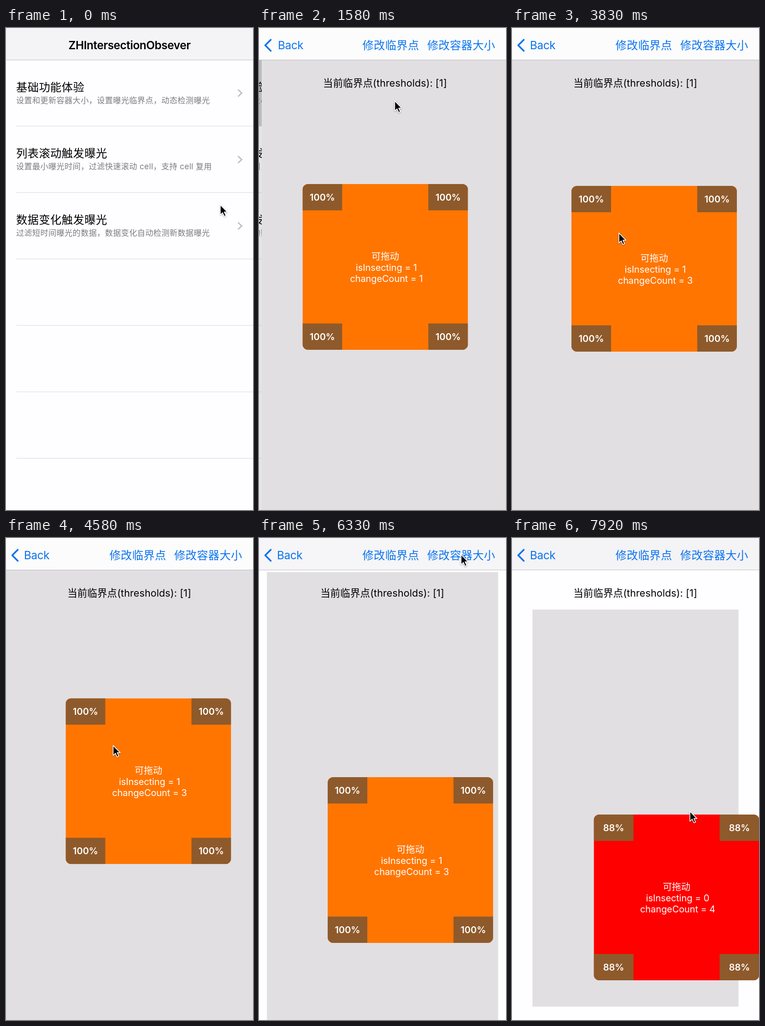
These frames come from a looping animation (536 by 1044 pixels, 8000 ms). An HTML page:

```html
<!DOCTYPE html>
<html lang="zh-CN">
<head>
<meta charset="utf-8">
<title>ZHIntersectionObsever</title>
<style>
  html, body { margin: 0; width: 100%; height: 100%; overflow: hidden; background: #fefdff; }
  svg { display: block; width: 100vw; height: 100vh; }
  text { font-family: Inter, "Noto Sans CJK SC", "Noto Sans CJK", sans-serif; white-space: pre; }
  .mid { text-anchor: middle; }
  .nav { font-size: 24.3px; letter-spacing: .3px; fill: #0a73ee; }
  #back { letter-spacing: -.4px; }
  .title { font-size: 24.3px; font-weight: 600; letter-spacing: -.4px; }
  .name { font-size: 24.3px; letter-spacing: .4px; }
  .info { font-size: 17.2px; letter-spacing: .33px; fill: #7c7b7f; }
  .label { font-size: 21.5px; letter-spacing: .1px; }
  .body { font-size: 20px; letter-spacing: -.1px; fill: #fff; }
  .pct { font-size: 20px; font-weight: 600; fill: #fff; }
</style>
</head>
<body>
<svg viewBox="0 0 536 1044" preserveAspectRatio="none">
  <defs><clipPath id="round"><rect width="359" height="359" rx="12"/></clipPath></defs>
  <rect width="536" height="1044" fill="#fefdff"/>
  <g id="list">
    <rect id="tap" y="69" width="536" height="143.5" fill="#d0cfd4"/>
    <g id="rows"></g>
  </g>
  <rect id="dim" width="536" height="1044"/>
  <g id="page">
    <rect width="536" height="1044" fill="#fefdff"/>
    <rect id="box" fill="#e1dfe2"/>
    <text class="label mid" x="267.5" y="127">当前临界点(thresholds): [1]</text>
    <g id="card">
      <g clip-path="url(#round)">
        <rect id="fill" width="359" height="359"/>
        <g id="corners"></g>
      </g>
      <text class="body mid" x="179.5" y="163.5">可拖动</text>
      <text class="body mid" id="flag" x="182" y="187.5"></text>
      <text class="body mid" id="count" x="182" y="211.5"></text>
    </g>
  </g>
  <rect id="bar" width="536" height="69"/>
  <rect y="68.7" width="536" height="1" fill="#bdbcc0"/>
  <text class="title mid" id="title" y="46">ZHIntersectionObsever</text>
  <g id="tools">
    <path d="M25.5 25.5 L13.5 37.5 L25.5 49.5" fill="none" stroke="#0a73ee" stroke-width="3.6" stroke-linecap="round" stroke-linejoin="round"/>
    <text class="nav" id="back" y="46">Back</text>
    <text class="nav" x="224.5" y="46">修改临界点</text>
    <text class="nav" id="resize" x="365" y="46">修改容器大小</text>
  </g>
  <path id="cursor" d="M0 0 V21.5 L5 17 L8.7 25 L12.3 23.4 L8.8 15.6 H15.4 Z" stroke="#fff" stroke-width="1.6" stroke-linejoin="round" style="filter: drop-shadow(0 1.5px 1.5px rgba(0,0,0,.35))"/>
</svg>
<script>
const LOOP = 8000, STEP = 1000 / 12;
const $ = id => document.getElementById(id);
const set = (id, attrs) => { for (const k in attrs) $(id).setAttribute(k, attrs[k]); };
const clamp = v => Math.max(0, Math.min(1, v));
const mix = (a, b, p) => a.map((v, i) => v + (b[i] - v) * p);
const rgb = c => `rgb(${c.map(Math.round)})`;
const span = (t, start, length) => clamp((t - start) / length);
const ease = (t, start, length) => { const p = span(t, start, length); return p * p * (3 - 2 * p); };

// Moves are [start, duration, x, y], each taking over from the last.
const glide = (from, moves, t) =>
  moves.reduce((pos, [start, length, ...to]) => mix(pos, to, ease(t, start, length)), from);

const HOME = [88.5, 338];
const DRAGS = [
  [2640, 190, 113, 338], [2833, 420, 265, 344],
  [3420, 410, 129, 342], [4480, 420, 132, 377]
];
// The pointer also carries the card's displacement.
const POINTER = [465, 383];
const REACHES = [
  [85, 80, 318, 249], [250, 165, 294, 199], [500, 250, 294.5, 158],
  [1950, 550, 206, 440], [3250, 150, 191.5, 440],
  [5250, 500, 395, -3], [7750, 165, 342.5, 553]
];
// Container edges: left, top, right, bottom.
const FULL = [0, -67, 536, 1093], MEDIUM = [21.5, 111, 514.5, 1054], SMALL = [44.5, 155, 491.5, 1015];
const ORANGE = [255, 117, 0], RED = [255, 0, 0];

const ROWS = [
  ['基础功能体验', '设置和更新容器大小，设置曝光临界点，动态检测曝光'],
  ['列表滚动触发曝光', '设置最小曝光时间，过滤快速滚动 cell，支持 cell 复用'],
  ['数据变化触发曝光', '过滤短时间曝光的数据，数据变化自动检测新数据曝光']
];
let html = '';
for (let i = 0; i < 6; i++) {
  const y = 69 + i * 143.9;
  html += `<rect x="22" y="${y + 143}" width="514" height="1" fill="#d7d6da"/>`;
  if (ROWS[i]) html += `<text class="name" x="22" y="${y + 67.5}">${ROWS[i][0]}</text>
    <text class="info" x="22" y="${y + 93.5}">${ROWS[i][1]}</text>
    <path d="M503.5 ${y + 64.5} l8 7.5 l-8 7.5" fill="none" stroke="#bfbec3" stroke-width="2.8"/>`;
}
$('rows').innerHTML = html;

html = '';
for (const x of [0, 273]) for (const y of [0, 302])
  html += `<rect x="${x}" y="${y}" width="86" height="57" fill="#8e5a2b"/>
    <text class="pct mid" x="${x + 43}" y="${y + 36}"></text>`;
$('corners').innerHTML = html;
const percents = document.querySelectorAll('.pct');

function draw(t) {
  const push = 1 - (1 - span(t, 1195, 500)) ** 3;
  const first = ease(t, 5980, 500), second = ease(t, 7116, 500);
  const box = mix(mix(FULL, MEDIUM, first), SMALL, second);
  const [cx, cy] = glide(HOME, DRAGS, t);
  const [px, py] = glide(POINTER, REACHES, t);
  const outside = cx + 359 > 536, shrunk = t >= 7116;

  set('tap', { opacity: t >= 1165 ? 1 : 0 });
  set('list', { transform: `translate(${-161 * push})` });
  set('dim', { opacity: .1 * push });
  set('page', { transform: `translate(${536 * (1 - push)})` });
  set('box', { x: box[0], y: box[1], width: box[2] - box[0], height: box[3] - box[1] });

  set('card', { transform: `translate(${cx + box[0] + second} ${cy + box[1] + 67})` });
  set('fill', { fill: rgb(outside ? RED : mix(ORANGE, RED, second)) });
  $('flag').textContent = 'isInsecting = ' + (outside || shrunk ? 0 : 1);
  $('count').textContent = 'changeCount = ' + (shrunk ? 4 : outside ? 2 : t > 3400 ? 3 : 1);
  const pct = shrunk ? '88%' : outside ? '97%' : '100%';
  percents.forEach(p => p.textContent = pct);

  set('bar', { fill: rgb(mix([244, 243, 246], [252, 252, 253], push * (1 - first))) });
  set('title', { x: 268 - 200 * push, opacity: clamp(1 - push * 1.5) });
  set('tools', { opacity: clamp(push * 1.5 - .5) });
  set('back', { x: 39 + 180 * (1 - push) });
  const pressed = (t > 5900 && t < 6150) || (t > 7070 && t < 7800);
  set('resize', { opacity: pressed ? .35 : 1 });
  set('cursor', { transform: `translate(${px + cx - HOME[0]} ${py + cy - HOME[1]})` });
}

const origin = performance.now();
function tick() {
  const t = (performance.now() - origin) % LOOP;
  draw(Math.floor((t + 5) / STEP) * STEP);
  requestAnimationFrame(tick);
}
draw(0);
tick();
</script>
</body>
</html>
```
